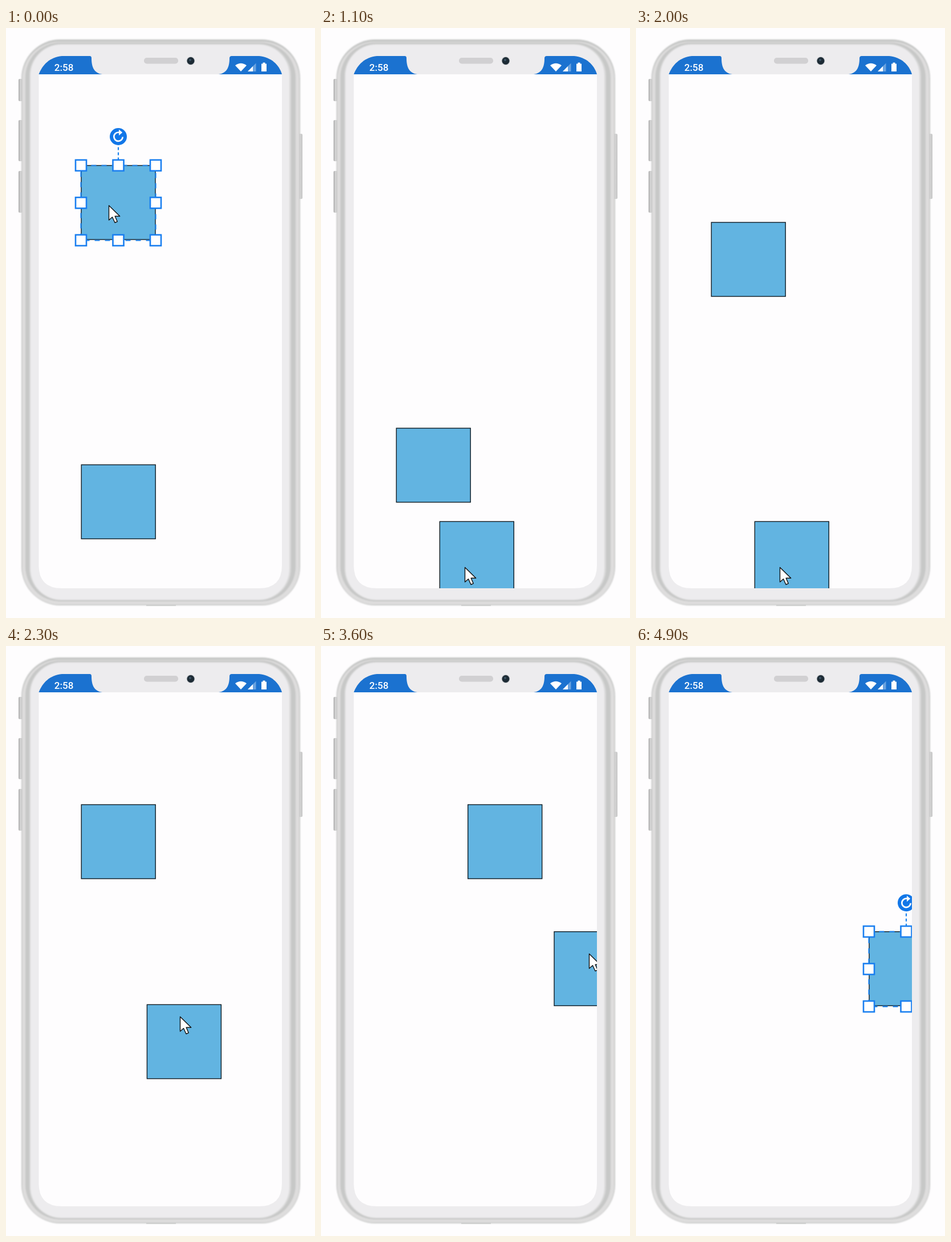
An HTML page that plays this animation: 542 px wide and 1032 px high, repeating every 5 s.

```html
<!DOCTYPE html>
<html lang="en">
<head>
<meta charset="utf-8">
<title>Drag with auto scroll</title>
<style>
  html, body { margin: 0; width: 100%; height: 100%; overflow: hidden; background: #fefdfe; }
  svg { display: block; }
  .box { fill: #62b4e1; stroke: #101c24; stroke-width: 1.4; }
  .line { fill: none; stroke: #1a82ee; stroke-width: 2.2; }
  .handle { fill: #fff; stroke: #1a7ff0; stroke-width: 2.6; }
  .time { font: 500 17px Roboto, sans-serif; fill: #fff; }
</style>
</head>
<body>
<svg width="542" height="1032" viewBox="0 0 542 1032">
  <defs>
    <clipPath id="screen">
      <path d="M57.500 81C64 64 77 51 98 49H444C465 51 479 64 484 81V940Q484 980 444 980H98Q57.500 980 57.500 940Z"/>
    </clipPath>
    <linearGradient id="key">
      <stop offset="0" stop-color="#aaa"/>
      <stop offset=".5" stop-color="#d6d6d6"/>
      <stop offset="1" stop-color="#c2c2c2"/>
    </linearGradient>
    <filter id="soft"><feGaussianBlur stdDeviation=".8"/></filter>
    <rect id="square" class="box" width="130" height="129.500"/>
  </defs>

  <g fill="url(#key)">
    <rect x="22" y="89" width="7" height="39" rx="2"/>
    <rect x="22" y="161" width="7" height="72" rx="2"/>
    <rect x="22" y="250" width="7" height="73" rx="2"/>
    <rect x="513" y="185" width="7" height="114" rx="2"/>
  </g>
  <rect x="246" y="1006" width="52" height="5" fill="#d2d2d2"/>
  <g filter="url(#soft)">
    <rect x="27" y="20" width="489" height="990" rx="68" fill="#c6c7c6"/>
    <rect x="28.500" y="24" width="486" height="984.500" rx="65" fill="#dedddd"/>
    <rect x="34" y="25.500" width="474" height="977.500" rx="61" fill="#c7c8c7"/>
    <rect x="41" y="28" width="459" height="973" rx="56" fill="#d9d9d9"/>
    <rect x="43" y="29" width="454" height="971" rx="54" fill="#edecee"/>
  </g>

  <g clip-path="url(#screen)">
    <rect x="50" y="81" width="440" height="900" fill="#fefdfe"/>
    <path fill="#1b72d0" d="M50 81V49H147Q150 49 150 53C150 69 155 79 169 81ZM490 81V49H396Q392 49 392 53C392 69 387 79 373 81Z"/>
    <svg y="81" x="0" width="542" height="900" viewBox="0 81 542 900">
      <g id="dragged">
        <use href="#square"/>
        <g id="selection">
          <rect class="line" x="-.5" width="131" height="131" stroke-dasharray="9 9"/>
          <path class="line" d="M65 0V-36" stroke-dasharray="5 4"/>
          <g transform="translate(65 -50.500)">
            <circle r="15" fill="#1277e8"/>
            <path d="M7.700 .5A7.700 7.700 0 1 1 0 -7.500H2" fill="none" stroke="#fff" stroke-width="2.700"/>
            <path d="M1 -12.500L7.200 -7.200L1 -2Z" fill="#fff"/>
          </g>
        </g>
      </g>
      <use id="first" href="#square"/>
      <use id="second" href="#square"/>
      <path id="cursor" d="M.5 .5V26L6.500 20.800L11 30.500L15.300 28.700L11.200 19.200H19.700Z" fill="#fff" stroke="#111" stroke-width="1.400" stroke-linejoin="round"/>
    </svg>
  </g>

  <rect x="242" y="52" width="60" height="10.500" rx="5" fill="#d1d0d2"/>
  <circle cx="324" cy="57.500" r="7.300" fill="#b9bdc1"/>
  <circle cx="324" cy="57.500" r="6.400" fill="#1d2b35"/>
  <circle cx="323" cy="56" r="2" fill="#3b5364"/>
  <text class="time" x="84.800" y="75">2:58</text>
  <g fill="#fff">
    <path d="M402 65.500Q412 58 422 65.500L412 76Z"/>
    <path d="M424 76L438.500 61.500V76Z" opacity=".35"/>
    <path d="M424 76L433 67V76Z"/>
    <path d="M448 62.500H450.500V60.500H454.500V62.500H457V76H448Z"/>
  </g>
</svg>
<script>
const LOOP = 5000, STEP = 100, SPEED = 0.4;
const $ = id => document.getElementById(id);

// time, box x, box y, cursor x, cursor y
const drag = [
  [0, 132, 240.5, 180, 310],
  [100, 137, 252, 185, 322],
  [300, 208, 420, 252, 490],
  [700, 208.3, 775.5, 252, 841],
  [900, 208.3, 863.3, 252, 943],
  [2000, 208.3, 863.3, 252, 943],
  [2100, 208.3, 795, 252, 865],
  [2200, 218, 695, 266, 740],
  [2300, 247.4, 627.3, 305, 648],
  [2500, 409, 499.7, 470, 538],
  [LOOP, 409, 499.7, 470, 538]
];

function sample(rows, t) {
  const i = rows.findIndex(row => row[0] > t);
  const a = rows[i - 1], b = rows[i];
  const k = (t - a[0]) / (b[0] - a[0]);
  return a.slice(1).map((v, j) => v + (b[j + 1] - v) * k);
}

const place = (id, x, y) => $(id).setAttribute("transform", `translate(${x} ${y})`);
const show = (id, on) => $(id).setAttribute("visibility", on ? "visible" : "hidden");

// Selection handles on corners and edge centres
for (let i = 0; i < 9; i++) {
  if (i === 4) continue;
  const handle = document.createElementNS("http://www.w3.org/2000/svg", "rect");
  const attrs = { class: "handle", width: 19, height: 19,
    x: (i % 3) * 65.5 - 10, y: Math.floor(i / 3) * 65.5 - 9.7 };
  for (const name in attrs) handle.setAttribute(name, attrs[name]);
  $("selection").append(handle);
}

function draw(t) {
  const [x, y, cx, cy] = sample(drag, t);
  const scrollY = Math.min(486.5, Math.max(0, t - 940) * SPEED);
  const scrollX = Math.max(0, t - 2532.5) * SPEED;
  place("dragged", x, y);
  place("first", 132.2 - scrollX, 764 - scrollY);
  place("second", 684.7 - scrollX, 277.5);
  place("cursor", cx, cy);
  show("second", t > 2500);
  show("selection", t < 100 || t >= 4700);
  show("cursor", t < 4800);
}

const start = performance.now();
function tick(now) {
  const t = Math.max(0, now - start) % LOOP;
  draw(Math.floor(t / STEP) * STEP);
  requestAnimationFrame(tick);
}
draw(0);
requestAnimationFrame(tick);
</script>
</body>
</html>
```
